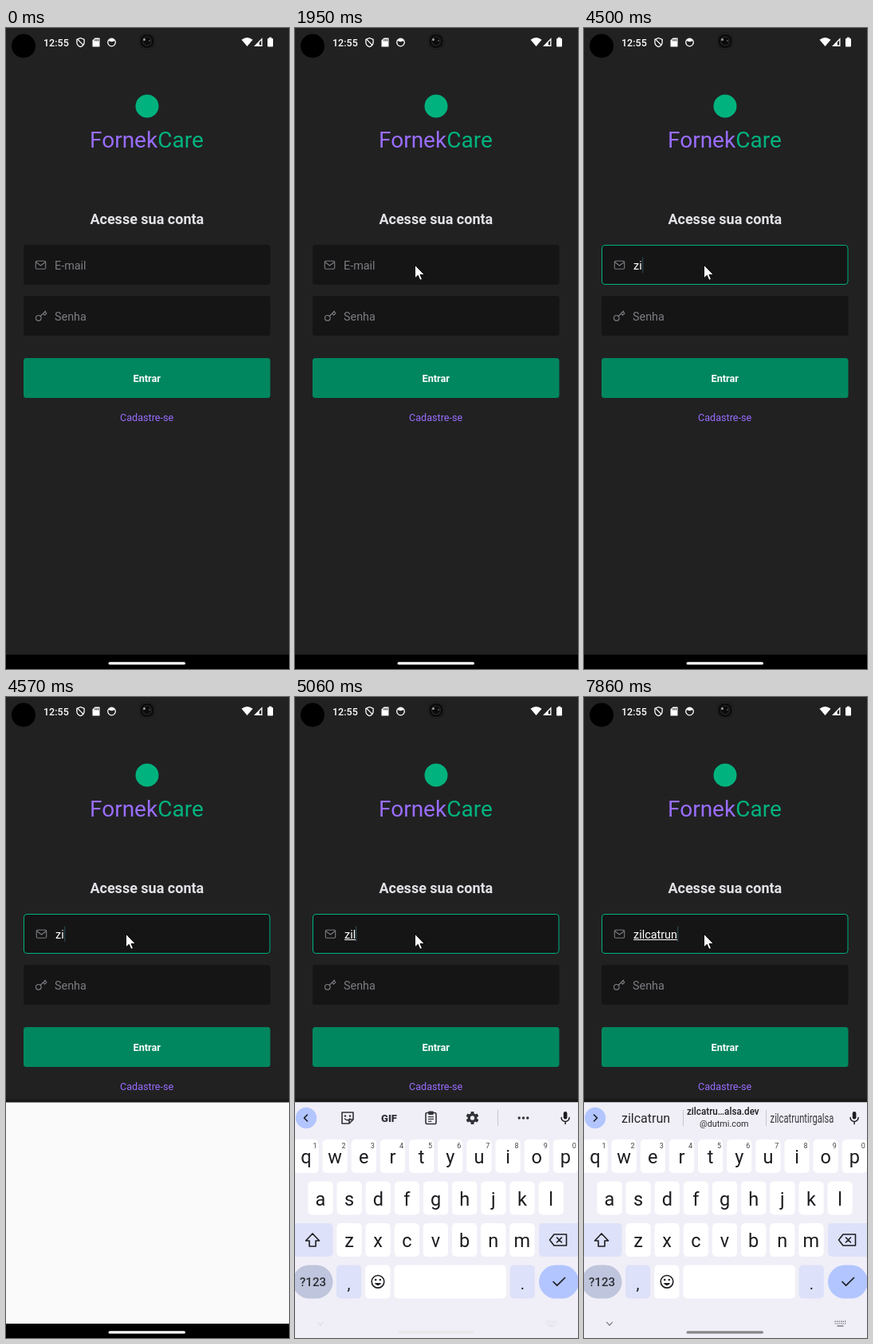
Write an HTML page with a canvas that moves like this. It is 355x804 px and loops after 8 s.

```html
<!DOCTYPE html>
<html lang="pt-BR">
<head>
<meta charset="utf-8">
<title>Acesse sua conta</title>
<style>
  html, body { margin: 0; width: 100%; height: 100%; overflow: hidden; background: #212122; }
  canvas { display: block; width: 100vw; height: 100vh; }
</style>
</head>
<body>
<canvas id="stage"></canvas>
<script>
const W = 355, H = 804, LOOP = 8000;
const canvas = document.getElementById('stage');
const ctx = canvas.getContext('2d');
const ratio = window.devicePixelRatio || 1;
canvas.width = W * ratio;
canvas.height = H * ratio;

const C = {
  bg: '#212122', field: '#151516', green: '#00b37e', button: '#00875f', purple: '#996dff',
  hint: '#7c7c82', board: '#f0eff7', key: '#ffffff', soft: '#dde1f9', pill: '#bfc5dc',
  accent: '#b2c5ff', ink: '#1c1c20'
};
const USER = 'zilcatrun';

// start time, letters typed, letters underlined, caret shown
const TYPING = [
  [0, 0, 0, 0], [1550, 0, 0, 1], [1950, 0, 0, 0], [2430, 0, 0, 1], [2890, 0, 0, 0], [3440, 0, 0, 1],
  [3770, 1, 0, 1], [4170, 1, 0, 0], [4500, 2, 0, 1], [4780, 3, 0, 1], [4920, 3, 3, 1],
  [5760, 4, 3, 1], [5900, 5, 4, 1], [5970, 5, 5, 1], [6120, 6, 5, 1], [6250, 7, 6, 1],
  [6460, 8, 7, 1], [6600, 9, 7, 1], [6670, 9, 8, 1], [6870, 9, 9, 1], [7400, 9, 9, 0], [7860, 9, 9, 1]
];

const clamp = v => Math.max(0, Math.min(1, v));
const font = (size, weight = 400) => `${weight} ${size}px Roboto, sans-serif`;

function text(s, x, y, size, color, { weight = 400, align = 'left', squeeze = 1 } = {}) {
  ctx.save();
  ctx.translate(x, y);
  ctx.scale(squeeze, 1);
  ctx.font = font(size, weight);
  ctx.textAlign = align;
  ctx.fillStyle = color;
  ctx.fillText(s, 0, 0);
  ctx.restore();
}

function rect(x, y, w, h, color, r = 0) {
  ctx.fillStyle = color;
  ctx.beginPath();
  ctx.roundRect(x, y, w, h, r);
  ctx.fill();
}

function frame(x, y, w, h, color, r = 0, width = 1) {
  ctx.strokeStyle = color;
  ctx.lineWidth = width;
  ctx.beginPath();
  ctx.roundRect(x, y, w, h, r);
  ctx.stroke();
}

function disc(x, y, r, color) {
  ctx.fillStyle = color;
  ctx.beginPath();
  ctx.arc(x, y, r, 0, Math.PI * 2);
  ctx.fill();
}

function ring(x, y, r, color, width) {
  ctx.strokeStyle = color;
  ctx.lineWidth = width;
  ctx.beginPath();
  ctx.arc(x, y, r, 0, Math.PI * 2);
  ctx.stroke();
}

// SVG path drawn at an offset
function shape(d, x, y, { fill, stroke, width = 1.2 } = {}) {
  const p = new Path2D(d);
  ctx.save();
  ctx.translate(x, y);
  ctx.lineJoin = ctx.lineCap = 'round';
  if (fill) { ctx.fillStyle = fill; ctx.fill(p); }
  if (stroke) { ctx.strokeStyle = stroke; ctx.lineWidth = width; ctx.stroke(p); }
  ctx.restore();
}

function drawStatus() {
  const white = '#ffffff';
  disc(22, 22.5, 15, '#000000');
  disc(177, 16.5, 10.5, '#0b0b0b');
  ring(177, 16.5, 9.5, '#303030', 1);
  ring(177, 16.5, 5.5, '#222222', 1.5);
  disc(173.5, 14.5, 1.5, '#a0a0a0');
  disc(180, 16, 0.9, '#606060');

  text('12:55', 47, 22.5, 12.5, white, { weight: 500 });
  shape('M0 -5.5L4.6 -3.7V0C4.6 3 2.5 4.8 0 5.6C-2.5 4.8 -4.6 3 -4.6 0V-3.7ZM-3.6 -3.6L3.4 3.4', 93.5, 18, { stroke: white, width: 1.3 });
  shape('M-1.5 -5.5H4.5V5.5H-4.5V-2.5Z', 113, 18, { fill: white });
  for (let i = 0; i < 3; i++) rect(111.3 + i * 2, 14, 1, 2.4, C.bg);
  ring(132.5, 18, 4.8, white, 1.3);
  shape('M-4.5 -1Q0 -6 4.5 -1L2.5 -.4Q0 1 -2.5 -.4Z', 132.5, 17, { fill: white });

  shape('M0 5.5L-7 -2.8Q0 -8 7 -2.8Z', 302.5, 17.5, { fill: white });
  shape('M0 5.3H10.5V-5.3Z', 311, 17.6, { fill: white });
  shape('M6.8 4V0.5L9.2 -2V4Z', 311, 17.6, { fill: C.bg });
  rect(328, 13, 7, 10.5, white, 1);
  rect(329.8, 11.7, 3.4, 2, white);
}

function drawLogin(state, focused) {
  const [, typed, underlined, caret] = state;
  disc(177, 98, 14.5, C.green);
  text('Fornek', 105, 150, 28, C.purple);
  text('Care', 190.3, 150, 28, C.green);
  text('Acesse sua conta', 176.8, 246, 18, '#e1e1e6', { weight: 700, align: 'center' });

  rect(22, 272, 309.5, 50, C.field, 3.5);
  rect(22, 336, 309.5, 50, C.field, 3.5);
  if (focused) frame(22.5, 272.5, 308.5, 49, C.green, 3.5);

  const shift = focused ? 1 : 0;
  const left = 61 + shift;
  frame(37.3 + shift, 292.3, 12.4, 10, C.hint, 1.5, 1.1);
  shape('M0 0L6 4.5L12 0', 37.5 + shift, 293.5, { stroke: C.hint, width: 1.1 });
  ring(40.8, 363.8, 3.3, C.hint, 1.2);
  shape('M0 0L6.3 -6.3M3.3 -3.3L5.3 -1.3L7.7 -3.7L5.6 -5.8', 43.2, 361.5, { stroke: C.hint, width: 1.2 });

  if (typed) text(USER.slice(0, typed), left, 302.7, 14.4, '#ffffff');
  else text('E-mail', left, 302.7, 14.4, C.hint);
  text('Senha', 61, 366.7, 14.4, C.hint);

  ctx.font = font(14.4);
  const widthOf = n => ctx.measureText(USER.slice(0, n)).width;
  if (underlined) rect(left, 304, widthOf(underlined), 1, '#ffffff');
  if (caret) rect(Math.round(left + widthOf(typed)), 287.5, 1.3, 19.5, '#29434b');

  rect(22, 414, 309.5, 50, C.button, 3.5);
  text('Entrar', 176.7, 443.7, 12.7, '#ffffff', { weight: 700, align: 'center' });
  text('Cadastre-se', 176.6, 493, 12.6, C.purple, { align: 'center' });
}

function drawMic() {
  rect(336.8, 520, 4.6, 9.5, C.ink, 2.3);
  shape('M-5 0A5 5 0 0 0 5 0M0 5V8', 339.1, 527.5, { stroke: C.ink, width: 1.5 });
}

function drawTools() {
  const ink = '#303238';
  disc(14, 528, 13.2, C.accent);
  shape('M2 -4L-2 0L2 4', 13.5, 528, { stroke: C.ink, width: 1.6 });

  shape('M-7 -7H7V2L2 7H-7ZM7 2H2V7M-3.5 1Q0 4.5 3 1', 66, 528, { stroke: ink, width: 1.6 });
  disc(63, 525.5, 1.2, ink);
  disc(69, 525.5, 1.2, ink);
  text('GIF', 118, 532.7, 13, ink, { weight: 900, align: 'center' });

  frame(164, 521.5, 13, 14, ink, 1.5, 1.6);
  rect(167.2, 519.5, 6.6, 4.5, ink, 1);
  for (let i = 0; i < 3; i++) rect(167, 526 + i * 2.8, i === 2 ? 4.5 : 7, 1.2, ink);

  for (let i = 0; i < 6; i++) {
    ctx.save();
    ctx.translate(222.5, 528);
    ctx.rotate(i * Math.PI / 3);
    rect(-2, -8, 4, 5, ink, 0.8);
    ctx.restore();
  }
  ring(222.5, 528, 4.3, ink, 3.2);
  rect(254, 518, 1, 20, '#c6c6ce');
  for (let i = -1; i < 2; i++) disc(286.5 + i * 5.3, 528, 1.7, ink);
}

function drawSuggestions() {
  const mid = { align: 'center' };
  disc(14, 528, 13.2, C.accent);
  shape('M-2 -4L2 0L-2 4', 14.5, 528, { stroke: C.ink, width: 1.6 });
  text(USER, 77.5, 534, 16, '#26262a', mid);
  rect(124, 518, 1, 20, '#c6c6ce');
  text('zilcatru…alsa.dev', 174.3, 523.7, 13.3, C.ink, { weight: 500, align: 'center', squeeze: 0.88 });
  text('@dutmi.com', 175.8, 539, 10.8, '#2c2c30', mid);
  rect(228, 518, 1, 20, '#c6c6ce');
  text(USER + 'tirgalsa', 273.5, 534, 16, '#3a3a3e', { align: 'center', squeeze: 0.7 });
}

function drawKeys(upper) {
  const pitch = 36.15;
  const row = (letters, first, top) => [...letters].forEach((ch, i) => {
    const x = first + i * pitch;
    rect(x - 15.6, top, 31.2, 42, C.key, 5);
    text(upper ? ch.toUpperCase() : ch, x, top + 30, 23.5, C.ink, { align: 'center' });
    if (top < 600) text(String((i + 1) % 10), x + 11, 566, 9, '#44464c', { align: 'center' });
  });
  row('qwertyuiop', 14, 555);
  row('asdfghjkl', 32, 607.5);
  row('zxcvbnm', 68, 660);

  rect(-6, 660, 53.5, 42, C.soft, 5);
  shape('M0 -8.5L8.5 0.5H4V7.5H-4V0.5H-8.5Z', 22, 681.5, upper ? { fill: C.ink } : { stroke: C.ink, width: 1.6 });
  rect(306, 660, 56, 42, C.soft, 5);
  shape('M-11 0L-5.5 -7H10V7H-5.5ZM-2 -3L4 3M4 -3L-2 3', 330.5, 681, { stroke: C.ink, width: 1.6 });

  rect(-3, 712.5, 50.5, 42, C.pill, 21);
  text('?123', 22.5, 739.2, 15, '#2b2d34', { weight: 500, align: 'center' });
  rect(52, 712.5, 31.2, 42, C.soft, 5);
  text(',', 67.5, 743, 20, C.ink, { align: 'center' });
  rect(88.2, 712.5, 31.2, 42, C.key, 5);
  ring(104, 733.3, 7.8, C.ink, 1.6);
  disc(101.2, 731, 1.3, C.ink);
  disc(106.8, 731, 1.3, C.ink);
  shape('M-4.2 0Q0 6.5 4.2 0Z', 104, 735, { fill: C.ink });
  rect(124.5, 712.5, 140.5, 42, C.key, 5);
  rect(269.7, 712.5, 31.2, 42, C.soft, 5);
  text('.', 285.3, 743, 20, C.ink, { align: 'center' });
  rect(306, 712.5, 50, 42, C.accent, 21);
  shape('M-7 0L-2.3 4.7L7.5 -5', 331, 733.5, { stroke: C.ink, width: 1.7 });
}

function drawNavIcons(alpha) {
  const grey = '#77777d';
  ctx.save();
  ctx.globalAlpha = alpha;
  shape('M-3.5 -2L0 1.7L3.5 -2', 32, 786.3, { stroke: grey, width: 1.2 });
  for (let r = 0; r < 2; r++)
    for (let i = 0; i < 6; i++) rect(314.5 + i * 2.5, 782.5 + r * 2.7, 1.4, 1.4, grey);
  rect(317.5, 788.2, 8, 1.4, grey);
  ctx.restore();
}

function drawKeyboard(t) {
  rect(0, 504, W, 4.5, 'rgba(0,0,0,0.22)');
  rect(0, 508.5, W, H - 508.5, '#fafafa');
  if (t >= 4640) {
    const step = Math.floor((t - 4570) / 70) / 3;
    const drop = 278 * Math.pow(1 - clamp(step), 2.4);
    ctx.save();
    ctx.translate(0, drop);
    rect(0, 508.5, W, H - 508.5, C.board);
    if (t < 7200) drawTools(); else drawSuggestions();
    drawMic();
    drawKeys(t < 4920);
    ctx.restore();
  }
  if (t >= 5060) drawNavIcons(clamp((t - 4990) / 480));
}

function drawHandle(t) {
  if (t < 4640) rect(0, 786, W, 18, '#000000');
  const fade = clamp((Math.floor(t / 70) * 70 - 4850) / 1050);
  const tone = v => Math.round(255 + (v - 255) * fade);
  rect(128.5, 795.2, 96.5, 3.4, `rgb(${tone(134)},${tone(133)},${tone(138)})`, 1.7);
}

function drawPointer(t) {
  if (t < 460) return;
  const p = clamp(Math.floor((t - 460) / 69) / 10);
  const left = 1 - p;
  const x = 150.5 + 147 * left * left;
  const y = 297.5 + 426 * left * left;
  shape('M0 0V16.3L3.8 12.8L6.4 18.8L9 17.7L6.5 11.9H11.6Z', x, y, { fill: '#ffffff', stroke: '#000000', width: 0.9 });
  if (t >= 1220 && t < 1350) disc(150, 297, 12, 'rgba(255,255,0,0.47)');
}

function draw(t) {
  ctx.setTransform(ratio, 0, 0, ratio, 0, 0);
  rect(0, 0, W, H, C.bg);
  drawStatus();
  drawLogin(TYPING.findLast(s => t >= s[0]), t >= 2210);
  if (t >= 4570) drawKeyboard(t);
  drawHandle(t);
  drawPointer(t);
}

const start = performance.now();
function tick() {
  draw((performance.now() - start) % LOOP);
  requestAnimationFrame(tick);
}
tick();
</script>
</body>
</html>
```
